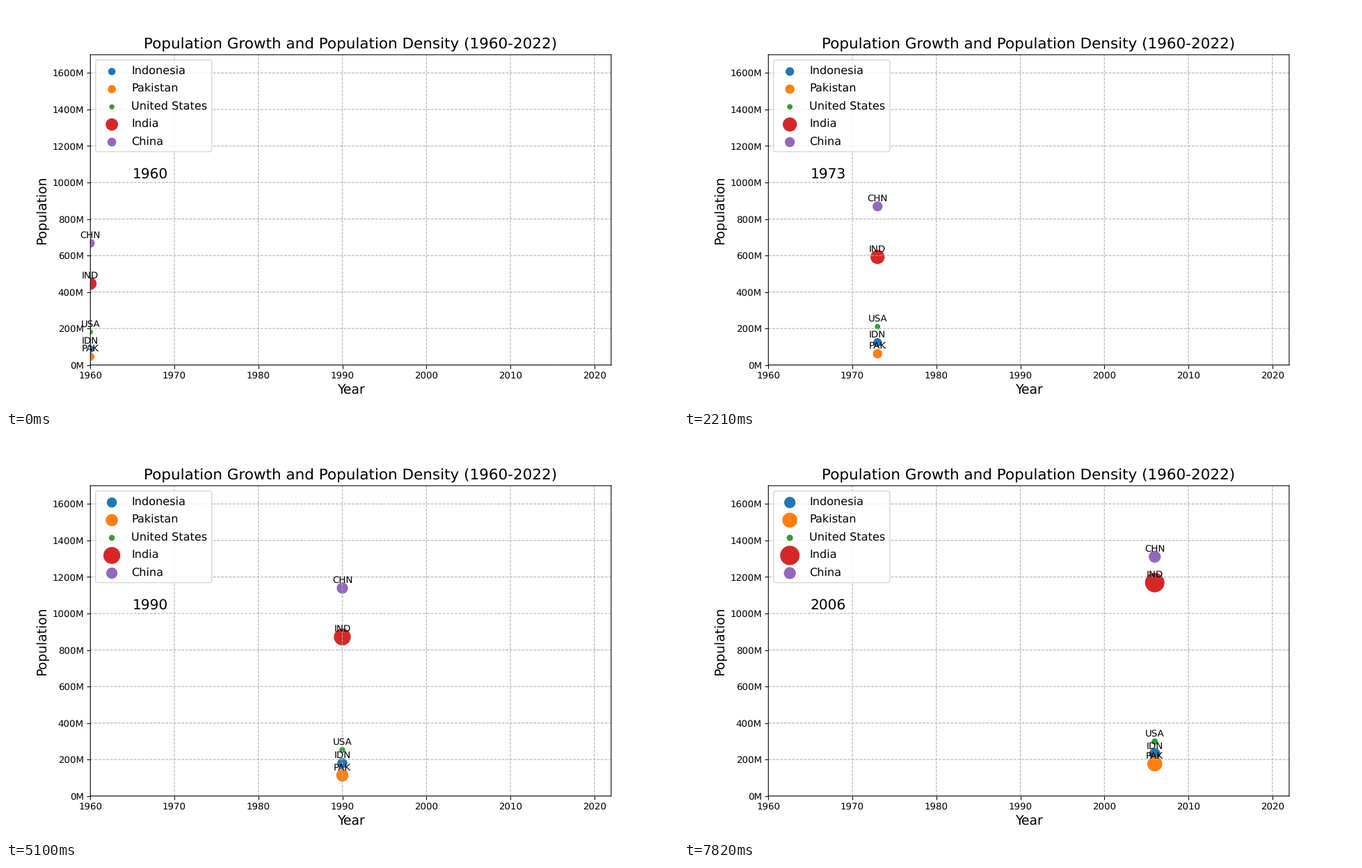
Write a matplotlib script that moves like this. It is 966 px wide and 580 px high and loops after 7.99 s.

```python
import numpy as np
import matplotlib.pyplot as plt
from matplotlib.animation import FuncAnimation
from matplotlib.patches import FancyBboxPatch
from matplotlib.transforms import IdentityTransform

W, H, DPI = 966, 580, 96.6
START, FRAMES, STEP_MS = 1960, 47, 170

# Years after START at which each growth curve is pinned
PINS = [0, 18, 34, 46]
# name, code, land area (million square km), millions of people at the pins
COUNTRIES = [
    ("Indonesia", "IDN", 1.878, (88, 140, 194, 231)),
    ("Pakistan", "PAK", 0.771, (46, 74, 128, 176)),
    ("United States", "USA", 9.147, (181, 222, 263, 298)),
    ("India", "IND", 2.973, (446, 666, 945, 1169)),
    ("China", "CHN", 9.388, (667, 956, 1192, 1311)),
]
COLORS = [f"C{i}" for i in range(len(COUNTRIES))]
AREAS = np.array([c[2] for c in COUNTRIES])
CURVES = [np.polyfit(PINS, c[3], 3) for c in COUNTRIES]
CHINA = len(COUNTRIES) - 1

# Unsnapped lines and unhinted text keep their fractional positions
plt.rcParams.update({"font.family": "DejaVu Sans", "text.hinting": "none",
                     "path.snap": False})
# The tiny margin keeps the pixel size from rounding down
fig, ax = plt.subplots(figsize=((W + 1e-6) / DPI, (H + 1e-6) / DPI), dpi=DPI)
# Default margins, moved half a pixel right and down
fig.subplots_adjust(left=0.125 + 0.5 / W, right=0.9 + 0.5 / W,
                    bottom=0.11 - 0.5 / H, top=0.88 - 0.5 / H)
pixels = IdentityTransform()


def populations(t):
    people = np.array([np.polyval(c, t) for c in CURVES])
    people[CHINA] -= 28 * t * np.exp(-t / 3)  # slump of the early 1960s
    return people


def draw_legend():
    """Legend box laid out in pixels; returns its markers."""
    left, top, width, height = 128.8, 77.65, 167.0, 132.0
    ax.add_artist(FancyBboxPatch(
        (left, H - top - height), width, height,
        boxstyle="round,pad=0,rounding_size=3.2", fc="white", ec="0.8",
        lw=1, alpha=0.8, transform=pixels, zorder=5))
    rows = H - 94.3 - 25.4 * np.arange(len(COUNTRIES))
    for y, country in zip(rows, COUNTRIES):
        ax.text(180.3, y - 3.4, country[0], fontsize=12,
                transform=pixels, zorder=6)
    return ax.scatter(np.full(len(rows), 152.15), rows, c=COLORS,
                      linewidths=1, transform=pixels, zorder=6)


first = populations(0)
dots = ax.scatter(np.full(len(first), START), first, c=COLORS, linewidths=1)
keys = draw_legend()
tags = [ax.annotate(c[1], (START, p), xytext=(0, 5.6), textcoords="offset points",
                    ha="center", fontsize=10, annotation_clip=False)
        for c, p in zip(COUNTRIES, first)]
year_text = ax.text(1965, 1020, str(START), fontsize=15)

ax.set_xlim(1960, 2022)
ax.set_ylim(0, 1700)
ax.set_xticks(range(1960, 2021, 10))
ax.set_yticks(range(0, 1601, 200))
ax.yaxis.set_major_formatter(lambda v, pos: f"{v:.0f}M")
ax.grid(True, linestyle="--")
ax.set_title("Population Growth and Population Density (1960-2022)", fontsize=16)
ax.set_xlabel("Year", fontsize=14)
ax.set_ylabel("Population", fontsize=14)


def update(frame):
    year = START + frame
    people = populations(frame)
    dots.set_offsets([(year, count) for count in people])
    for marks in (dots, keys):
        marks.set_sizes(people / AREAS)
    for tag, count in zip(tags, people):
        tag.xy = (year, count)
    year_text.set_text(str(year))
    return [dots, keys, year_text, *tags]


anim = FuncAnimation(fig, update, frames=FRAMES, interval=STEP_MS,
                     init_func=lambda: update(0), repeat=True, repeat_delay=0)
plt.show()
```
